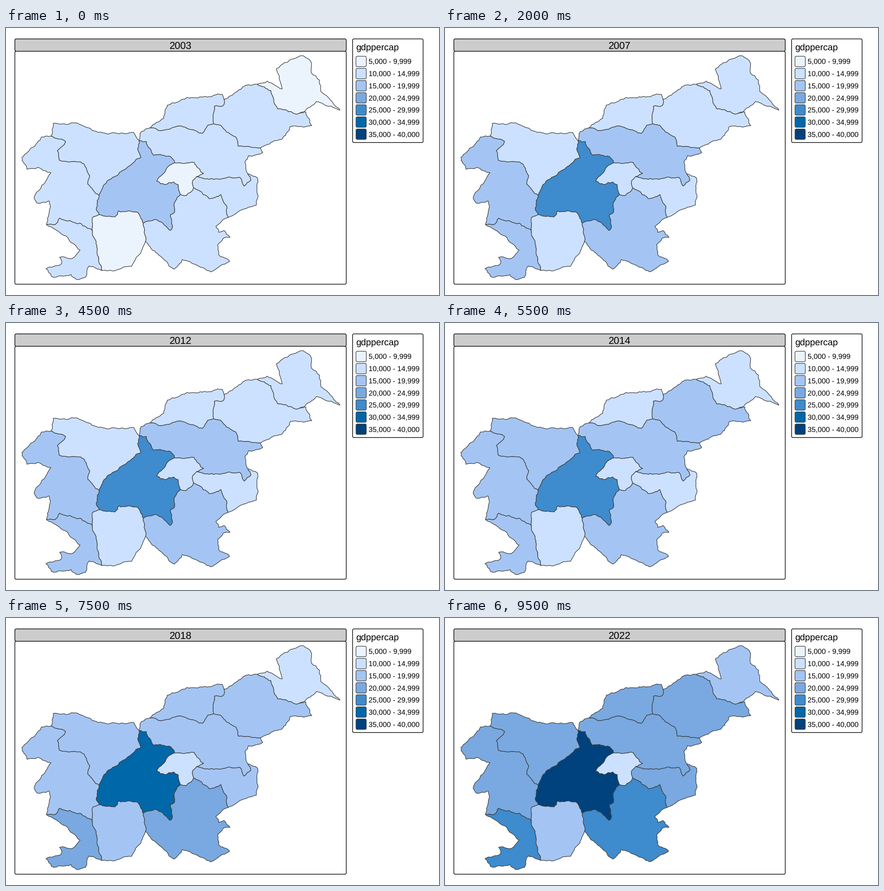
These frames come from a looping animation (953 by 588 pixels, 10 s). A matplotlib script:

```python
import math
import random

import matplotlib.pyplot as plt
from matplotlib.animation import FuncAnimation
from matplotlib.patches import FancyBboxPatch, Polygon

plt.rcParams["text.hinting"] = "none"
plt.rcParams["text.hinting_factor"] = 1

W, H, DPI = 953, 588, 64
PT = 72 / DPI  # points per pixel
FIRST_YEAR, YEARS = 2003, 20
BLUES = ["#EBF3FD", "#CCE1FF", "#A4C5F3", "#79A9E0", "#3E8BCD", "#0067A9", "#00427D"]
LINE = "#404040"

# Points where borders meet.
NODES = dict(
    A=(99, 238), B=(293, 248), C=(317, 220), D=(457, 211), E=(480, 157), F=(553, 124),
    G=(645, 188), H=(560, 264), I=(532, 321), J=(420, 327), K=(371, 297), L=(384, 367),
    M=(413, 352), N=(489, 417), O=(302, 430), P=(307, 470), Q=(211, 534), R=(190, 446),
    S=(205, 411), T=(205, 369), U=(89, 433), W=(735, 181),
)
arcs = {}


def roughen(p, q, rng):
    """Points after p up to q, with midpoints shifted sideways until steps are short."""
    (x0, y0), (x1, y1) = p, q
    length = math.dist(p, q)
    if length < 7:
        return [q]
    bend = rng.uniform(-1, 1) * min(0.16, 2 / length)
    mid = ((x0 + x1) / 2 - bend * (y1 - y0), (y0 + y1) / 2 + bend * (x1 - x0))
    return roughen(p, mid, rng) + roughen(mid, q, rng)


def arc(ends, *turns):
    """Store a rough border between two nodes that passes through its main turns."""
    rng = random.Random(ends)
    points = [NODES[ends[0]], *turns, NODES[ends[1]]]
    path = points[:1]
    for p, q in zip(points, points[1:]):
        path += roughen(p, q, rng)
    arcs[ends] = path
    arcs[ends[::-1]] = path[::-1]


# North-west
arc("AB", (104, 210), (150, 209), (196, 227), (229, 232), (281, 230))
arc("AT", (131, 250), (113, 270), (117, 291), (171, 299), (184, 325), (180, 344))
arc("BT", (290, 266), (297, 285), (248, 322), (222, 338))
arc("UA", (97, 397), (95, 381), (68, 385), (62, 375), (99, 319), (70, 307), (46, 311),
    (35, 285), (78, 240))
# Centre
arc("BK", (309, 250), (325, 280), (362, 283))
arc("KL", (356, 306), (332, 337), (350, 345), (369, 339), (379, 345))
arc("KJ", (414, 296), (435, 320))
arc("JM", (411, 336))
arc("ML", (397, 369))
arc("LO", (373, 381), (371, 406), (362, 411), (366, 440), (361, 446), (333, 423))
arc("SO", (240, 416), (248, 403), (287, 405))
arc("TS", (201, 380), (199, 396))
# South-west
arc("SR", (192, 416))
arc("OP", (304, 450))
arc("PQ", (298, 491), (276, 525), (235, 535))
arc("RQ", (198, 475))
arc("UR", (108, 433), (118, 419), (163, 430))
arc("QU", (183, 524), (175, 549), (155, 554), (143, 543), (100, 547), (88, 530), (122, 519),
    (118, 505), (145, 508), (163, 489), (132, 458))
# South-east
arc("JI", (443, 332), (515, 329), (524, 348), (539, 335))
arc("IN", (554, 331), (551, 390), (507, 408))
arc("MN", (434, 367), (447, 376), (473, 367), (484, 390))
arc("NP", (462, 437), (468, 450), (480, 446), (493, 461), (478, 463), (466, 477), (468, 499),
    (492, 514), (450, 537), (388, 510), (370, 531), (320, 487))
# North-east
arc("BC", (298, 228))
arc("CE", (347, 199), (355, 170), (398, 153), (476, 146))
arc("ED", (478, 171), (459, 172), (456, 198))
arc("CD", (342, 226), (377, 216), (432, 232), (444, 214))
arc("DH", (476, 218), (506, 240), (511, 260))
arc("HI", (565, 274), (534, 281), (526, 295))
arc("EF", (503, 143), (528, 126))
arc("FG", (583, 138), (598, 178))
arc("FW", (575, 117), (608, 134), (595, 90), (648, 61), (670, 72), (672, 99), (690, 115),
    (693, 140))
arc("WG", (683, 162), (655, 185))
arc("GH", (660, 185), (673, 215), (626, 217), (610, 241))

# Ring of nodes: first class, years of lasting rises, years of one-year peaks.
REGIONS = {
    "ABT": (1, [2013, 2021], [2008, 2019]),
    "ATSRU": (1, [2007, 2021], [2019]),
    "BKLOST": (2, [2005, 2007, 2018, 2021], []),
    "KJML": (0, [2006], []),
    "JINM": (1, [2017, 2022], []),
    "MNPOL": (1, [2006, 2017, 2022], []),
    "SOPQR": (0, [2004, 2017], []),
    "RQU": (1, [2005, 2017, 2022], [2008]),
    "BCDHIJK": (1, [2007, 2021], [2019]),
    "CED": (1, [2016, 2022], []),
    "EFGHD": (1, [2014, 2021], [2008]),
    "FWG": (0, [2006, 2019], []),
}

fig = plt.figure(figsize=(W / DPI, H / DPI), dpi=DPI, facecolor="white")
ax = fig.add_axes([0, 0, 1, 1])
ax.set(xlim=(0, W), ylim=(H, 0))
ax.axis("off")


def box(x0, y0, x1, y1, fill, edge="black", width=1.4):
    ax.add_patch(FancyBboxPatch(
        (x0, y0), x1 - x0, y1 - y0, boxstyle="round,pad=0,rounding_size=3",
        facecolor=fill, edgecolor=edge, linewidth=width * PT))


def label(x, y, text, size, **kwargs):
    return ax.text(x, y, text, fontsize=size * PT, family="Liberation Sans",
                   va="baseline", **kwargs)


def ring_path(ring):
    return [p for a, b in zip(ring, ring[1:] + ring[0]) for p in arcs[a + b][:-1]]


def level(ring, year):
    start, rises, peaks = REGIONS[ring]
    return start + sum(year >= rise for rise in rises) + (year in peaks)


box(19.5, 51.3, 748.8, 564.3, "white")
box(19.5, 24, 748.8, 51.3, "#CCCCCC")
box(762.8, 24, 918, 252.3, "white")
year_text = label(384.3, 46, "", 22, ha="center")
label(769.7, 49.3, "gdppercap", 20.3)

for i, color in enumerate(BLUES):
    low = 5000 * (i + 1)
    high = low + (5000 if i == len(BLUES) - 1 else 4999)
    y = 73.7 + 26.7 * i
    box(770.3, y - 11.5, 793, y + 11.5, color, LINE, 1.3)
    label(797.6, y + 5.7, f"{low:,} - {high:,}", 15.8)

shapes = {
    ring: ax.add_patch(Polygon(ring_path(ring), closed=True, edgecolor=LINE,
                               linewidth=1.3 * PT, joinstyle="round"))
    for ring in REGIONS
}


def update(frame):
    year = FIRST_YEAR + frame
    year_text.set_text(str(year))
    for ring, shape in shapes.items():
        shape.set_facecolor(BLUES[level(ring, year)])
    return [year_text, *shapes.values()]


anim = FuncAnimation(fig, update, frames=YEARS, interval=500, repeat=True, repeat_delay=0)
plt.show()
```
